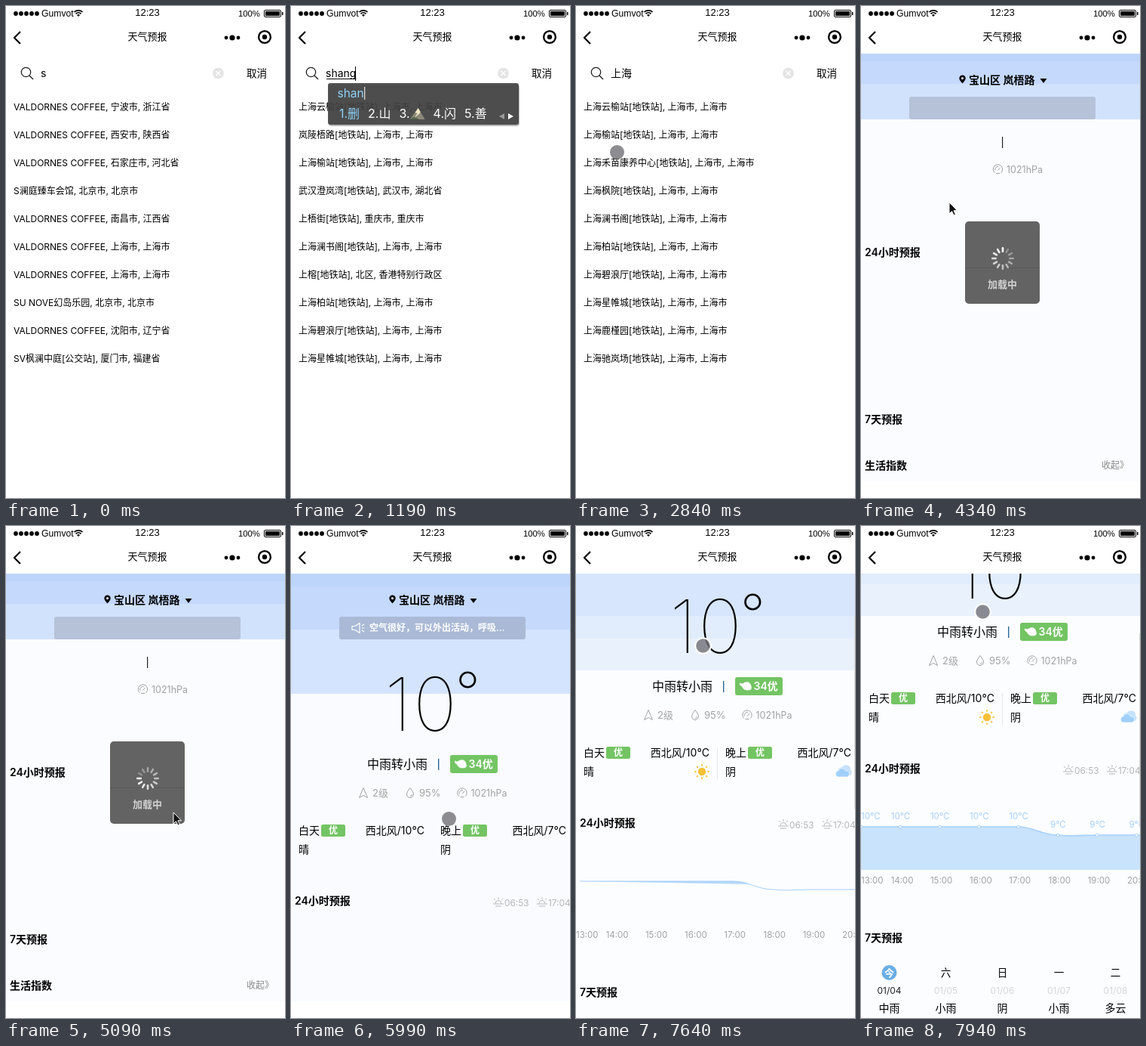
An HTML page for the animation above (8 s loop, 370x651 px).

```html
<!DOCTYPE html>
<html lang="zh-CN">
<head>
<meta charset="utf-8">
<title>天气预报</title>
<style>
html, body { margin: 0; width: 100%; height: 100%; overflow: hidden; background: #fff; }
svg { display: block; width: 370px; height: 651px; }
text { white-space: pre; }
</style>
</head>
<body>
<svg id="stage" viewBox="0 0 370 651"></svg>
<script>
const LOOP = 8000, FIRST = 290, STEP = 150;
const UI = 'Inter, "Noto Sans CJK SC", "Noto Sans CJK", sans-serif';
const SYS = '"Liberation Sans", sans-serif';
const GREEN = '#73c463', GRAY = '#a2a2a2', BLUE = '#a6d0fa';

const pen = document.createElement('canvas').getContext('2d');
const widthOf = (s, size) => { pen.font = `${size}px ${UI}`; return pen.measureText(s).width; };

// y is the vertical centre of the glyphs; baselines sit on whole pixels
const T = (s, x, y, size = 14, { fill = '#000', w = 400, a = 'start', font = UI } = {}) =>
  `<text x="${x}" y="${Math.round(y + size * .37)}" font-size="${size}" font-weight="${w}" fill="${fill}" text-anchor="${a}" font-family='${font}'>${s}</text>`;
const R = (x, y, w, h, fill, r = 0) => `<rect x="${x}" y="${y}" width="${w}" height="${h}" rx="${r}" fill="${fill}"/>`;
const C = (x, y, r, fill, more = '') => `<circle cx="${x}" cy="${y}" r="${r}" fill="${fill}" ${more}/>`;
const L = (d, stroke, w = 1, fill = 'none') =>
  `<path d="${d}" fill="${fill}" stroke="${stroke}" stroke-width="${w}" stroke-linejoin="round"/>`;
const at = (x, y, s) => `<g transform="translate(${x} ${y})">${s}</g>`;
const since = (table, t) => table.filter(row => row[0] <= t).pop();

// ---------- search page ----------
const sh = names => names.split(' ').map(n => n + '[地铁站], 上海市, 上海市');
const coffee = place => 'VALDORNES COFFEE, ' + place;
const LIST_S = [
  coffee('宁波市, 浙江省'), coffee('西安市, 陕西省'), coffee('石家庄市, 河北省'),
  'S澜庭臻车会馆, 北京市, 北京市', coffee('南昌市, 江西省'), coffee('上海市, 上海市'),
  coffee('上海市, 上海市'), 'SU NOVE幻岛乐园, 北京市, 北京市', coffee('沈阳市, 辽宁省'),
  'SV枫澜中庭[公交站], 厦门市, 福建省'];
const LIST_SHANG = [
  ...sh('上海云榆站 岚陵梧路 上海榆站'), '武汉澄岚湾[地铁站], 武汉市, 湖北省',
  '上梧街[地铁站], 重庆市, 重庆市', ...sh('上海澜书阁'), '上榕[地铁站], 北区, 香港特别行政区',
  ...sh('上海柏站 上海碧浪厅 上海星帷城')];
const LIST_FINAL = sh('上海云榆站 上海榆站 上海禾苗康养中心 上海枫院 上海澜书阁 上海柏站 上海碧浪厅 上海星帷城 上海鹿槿园 上海驰岚场');
const LIST_MID = [3, 0, 4, 1, 5, 6, 2, 7, 9, 8].map(i => LIST_FINAL[i]);
const LISTS = [[0, LIST_S], [1040, LIST_SHANG], [1790, LIST_MID], [2390, LIST_FINAL]];

// time, field text, composing, caret
const FIELD = [
  [0, 's', 0, 0], [290, 's', 1, 1], [740, 'sh', 1, 1], [890, 'sha', 1, 1], [1040, 'shan', 1, 1],
  [1190, 'shang', 1, 1], [1340, 'shangh', 1, 1], [1490, 'shanghai', 1, 1],
  [2240, '上海', 0, 1], [2840, '上海', 0, 0]];
// time, typed letters, candidates
const POPUP = [
  [0, ''], [590, 's', '是 说 时 上 三'], [890, 'sh', '是 上 时 说 谁'], [1040, 'sha', '啥 沙 杀 傻 纱'],
  [1190, 'shan', '删 山 ^ 闪 善'], [1340, 'shang', '上 商 伤 尚 赏'],
  [1490, 'shangh', '上海 商行 上 商 伤'], [1790, 'shanghai', '上海 伤害 商海 上还 上'], [2240, '']];

function popup(t) {
  const [, typed, words] = since(POPUP, t);
  if (!typed) return '';
  let x = 64, s = T(typed, 61.5, 115, 15.5, { fill: '#8fd2f8' });
  s += R(62 + widthOf(typed, 15.5), 107, 1, 17, '#fff');
  words.split(' ').forEach((word, i) => {
    const peak = word === '^', label = `${i + 1}.` + (peak ? '' : word);
    s += T(label, x, 142, 16, { fill: i ? '#fff' : '#8fd2f8' });
    x += widthOf(label, 16);
    if (peak) {
      s += at(x, 134, L('M0 16L11 1L20 16Z', 'none', 0, '#8b8878') + L('M11 1L7 7L10 8L6 14L13 8L14 6Z', 'none', 0, '#f1e6c4') + L('M0 16Q6 10 12 16Z', 'none', 0, '#54684a'));
      x += 20;
    }
    x += 11;
  });
  const right = Math.round(x + 31);
  return R(50, 104, right - 49, 55, 'rgba(0,0,0,.28)', 4) + R(49, 102, right - 49, 55, 'rgba(66,66,66,.9)', 3) + s +
    L(`M${right - 19} 142v8l-7-4z`, 'none', 0, '#999') + L(`M${right - 14} 142v8l7-4z`, 'none', 0, '#fff');
}

function searchPage(t) {
  const [, text, composing, caret] = since(FIELD, t), w = widthOf(text, 14);
  return C(26.5, 87.5, 6.2, 'none', 'stroke="#222" stroke-width="1.3"') + L('M31 92L36 97', '#222', 1.4) +
    T(text, 46, 88.5) +
    (composing ? R(47, 96, w - 1, 1, '#000') : '') + (caret ? R(Math.round(46 + w) - 1, 80, 1, 19, '#000') : '') +
    C(281.5, 89, 7.3, '#e4e4e4') + L('M278.5 86l6 6m0-6l-6 6', '#fff', 1.5) + T('取消', 319, 88.5, 13.6) +
    since(LISTS, t)[1].map((row, i) => T(row, 10, 133.5 + 37 * i, 12)).join('') + popup(t);
}

// ---------- weather page ----------
const bands = (stops, end) => stops.map(([y, fill], i) => R(0, y, 370, (stops[i + 1] || [end])[0] - y, fill)).join('');
const title = (s, y) => T(s, 5, y, 14, { w: 600 });
const place = () => L('M134.5 102.5C132 99.5 130.3 97.6 130.3 95.7a4.2 4.2 0 0 1 8.4 0C138.7 97.6 137 99.5 134.5 102.5Z', 'none', 0, '#000') +
  C(134.5, 95.7, 1.6, '#d2e2fd') + T('宝山区 岚梧路', 143, 98, 14, { w: 600 }) + L('M237.5 96h9l-4.5 6z', 'none', 0, '#000');
const gauge = (x, y) => at(x, y, L('M-4.2 4.6A6.2 6.2 0 1 1 4.2 4.6M-2.5 5.5H2.5', GRAY) + L('M-3.6 1.5A3.8 3.8 0 0 1 1-3.4M0 1.5L3-2', GRAY)) +
  T('1021hPa', x + 11.5, y, 12.5, { fill: GRAY });

function toast(t) {
  const head = 9 + Math.round((t - 5090) / 83.3);
  let s = R(138, 285, 99, 109, '#636363', 5) + R(138, 346, 99, 1, '#575757');
  for (let i = 0; i < 12; i++) {
    const age = ((head - i) % 12 + 12) % 12;
    s += `<rect x="186.7" y="319" width="2.6" height="7" rx="1.3" fill="#fff" opacity="${1 - age * .065}" transform="rotate(${i * 30} 188 334)"/>`;
  }
  return s + T('加载中', 187.5, 368, 13, { fill: '#d2d2d2', w: 600, a: 'middle' });
}

function loadingPage(t) {
  return R(0, 63, 370, 566, '#fbfcff') + bands([[63, '#bdd5fb'], [73, '#c5d9fd'], [103, '#d1e2fd']], 150) +
    place() + R(64, 120, 247, 30, '#b5c2d8', 3) + R(187, 173, 1.2, 15, '#222') + gauge(181.5, 216) +
    title('24小时预报', 326) + title('7天预报', 547) + title('生活指数', 608) +
    T('收起》', 319, 608, 12, { fill: '#888' }) + (t < 5540 ? toast(t) : '');
}

const badge = x => R(x, 395, 32, 16, GREEN, 2.5) + T('优', x + 16, 403, 12, { fill: '#fff', w: 600, a: 'middle' });
const half = (x, end, name, wind, sky) =>
  T(name, x, 403) + badge(x + 30) + T(wind, end, 403, 14, { a: 'end' }) + T(sky, x, 428);

function sun(x, y) {
  let rays = '';
  for (let i = 0; i < 8; i++) rays += `<path d="M0-7.5V-9.8" stroke="#f6c544" stroke-width="2" transform="rotate(${i * 45})"/>`;
  return at(x, y, C(0, 0, 5.2, '#f6c037') + rays);
}
const cloud = (x, y) => at(x, y,
  L('M-2 5a5.5 5.5 0 0 1 0-11a6 6 0 0 1 11 4a4 4 0 0 1-1 7Z', 'none', 0, '#c4e2fc') +
  L('M-6 7a4 4 0 0 1-1-8a5 5 0 0 1 9.5 0a4 4 0 0 1 2 8Z', '#fff', .6, '#a0d0fa'));
const horizon = (x, time) => at(x, 498, L('M-7 2H7M-4 5H4M-4 1.5A4 4 0 0 1 4 1.5M0-4V-7M-4-3L-6-5M4-3L6-5', '#b8b8b8')) +
  T(time, x + 8, 498.5, 11.8, { fill: '#b5b5b5' });

function chart(full) {
  const curve = '573H208C228 573 241 584 261 584C276 586 298 584 313 584H370';
  let s = full
    ? L(`M0 ${curve}V630H0Z`, 'none', 0, '#c9e3fd') + L(`M0 ${curve}`, BLUE, 1.6)
    : L('M5 573H208Q222 573 232 577Z', 'none', 0, '#b3d8fb') + L(`M5 ${curve}`, BLUE, 1);
  for (let i = 0; full && i < 8; i++) {
    const x = i * 52.2, warm = i < 5, y = warm ? 573 : 584;
    s += C(x, y, 1.9, '#fff', `stroke="${BLUE}"`) +
      T(warm ? '10°C' : '9°C', Math.max(0, x - (warm ? 12.5 : 10)), y - 14, 11.6, { fill: BLUE });
  }
  return s;
}
const hours = () => [...Array(8).keys()].map(i =>
  T(`${13 + i}:00`, Math.max(0, i * 52.2 - 12.5), 643.5, 11.5, { fill: GRAY })).join('');

const DAYS = ['今 中雨', '六 小雨', '日 阴', '一 小雨', '二 多云'];
const week = () => DAYS.map((day, i) => {
  const [name, sky] = day.split(' '), x = 37.5 + 75 * i, a = 'middle';
  return (i ? T(name, x, 766, 13.5, { a }) : C(x, 766, 10, '#6aaee5') + T(name, x, 766, 13, { a, fill: '#fff', w: 600 })) +
    T(`01/0${4 + i}`, x, 789.5, 12, { a, fill: i ? '#d6d6d6' : '#222' }) + T(sky, x, 812.5, 14, { a });
}).join('');

function weatherPage(t) {
  const scroll = t < 7640 ? 0 : 103 + (t - 7640) * .24;
  const back = scroll
    ? R(0, 0, 370, 900, '#fcfdff') + bands([[63, '#d7e5fd'], [222, '#e1edfd'], [252, '#e9f1fd']], 294)
    : R(0, 63, 370, 566, '#f9fbff') + bands([[63, '#bdd5fb'], [80, '#c5d9fd'], [137, '#d4e4fe']], 222);
  const thin = { w: 100 };
  let s = back + place() + R(64, 120, 247, 30, '#aabad6', 3) +
    L('M81 132.5h4l6-4v13l-6-4h-4zM94 132l3-2M94 135h3.5M94 138l3 2', '#fff', 1.2) +
    T('空气很好，可以外出活动，呼吸…', 104, 135, 12, { fill: '#fff', w: 600 }) +
    T('1', 160, 234.5, 98, { ...thin, a: 'end' }) + T('0', 191, 234.5, 98, { ...thin, a: 'middle' }) +
    C(234.3, 203.5, 9.8, 'none', 'stroke="#000" stroke-width="2.6"') +
    T('中雨转小雨', 101, 315, 16) + R(195, 308, 1.4, 15, '#2c6a96') +
    R(211, 303, 63, 24, GREEN, 3) +
    L('M217 311Q221 313 224 310Q230 308 232 314Q234 320 229 320Q222 321 220 315Q217 314 217 311Z', '#fff', .5, '#fff') +
    T('34优', 235.5, 315, 14, { fill: '#fff', w: 600 }) +
    L('M96 346.5l5.5 13l-5.5-3l-5.5 3z', GRAY) + T('2级', 108, 353, 13, { fill: GRAY }) +
    L('M158 346.5C160.5 350 162.5 352.5 162.5 355a4.5 4.5 0 0 1-9 0C153.5 352.5 155.5 350 158 346.5ZM158 357.5a2.5 2.5 0 0 0 2.5-2.5', GRAY) +
    T('95%', 170, 353, 13, { fill: GRAY }) + gauge(227, 353) +
    half(10, 177, '白天', '西北风/10°C', '晴') + half(198, 365, '晚上', '西北风/7°C', '阴') +
    title('24小时预报', 496) + horizon(275, '06:53') + horizon(333, '17:04') + title('7天预报', 720) + week();
  if (t >= 6140) s += R(187, 396, 1, 42, '#e4e8ee') + sun(167, 428) + cloud(355, 428);
  if (t >= 6440) s += hours();
  if (t >= 6740) s += chart(t >= 7790);
  return at(0, -scroll, s) + (scroll ? R(369, 119 + (scroll - 103) * .32, 1, 256, '#dcdcdc') : '');
}

// ---------- pointer and top bar ----------
const PATH = [
  [2840, 54.5, 193.5], [3140, 46, 206], [3440, 72, 214], [3590, 79, 218], [4040, 79, 218], [4190, 96, 236],
  [5090, 222, 379], [5540, 209, 425], [5840, 209, 425], [5990, 209.5, 387.5], [6890, 190, 324],
  [7340, 172, 232], [7490, 172, 232], [7640, 168.5, 158.5], [7940, 161.5, 113.5]];

function pointer(t) {
  if (t < PATH[0][0]) return '';
  const a = since(PATH, t), b = PATH[PATH.indexOf(a) + 1] || a;
  const k = b === a ? 0 : (t - a[0]) / (b[0] - a[0]);
  const x = a[1] + (b[1] - a[1]) * k, y = a[2] + (b[2] - a[2]) * k;
  if (t >= 4190 && t < 5540) return at(x, y, L('M0 0V15L3.5 11.7L6 17L8.3 16L6 10.8H10.5Z', '#fff', 1, '#111'));
  const ring = t >= 7640 ? 'stroke="#fff" stroke-width="2"' : '';
  return C(x, y, ring ? 10.3 : 9.5, 'rgba(112,113,118,.8)', ring);
}

function topBar() {
  let s = R(0, 0, 370, 63, '#fff');
  for (let i = 0; i < 5; i++) s += C(13 + 7 * i, 10, 2.9, '#000');
  return s + T('Gumvot', 47, 9, 12.2, { font: SYS }) +
    L('M90.5 8A8 8 0 0 1 101.5 8M92.5 10.3A5 5 0 0 1 99.5 10.3', '#000', 1.7) + L('M94 12A3 3 0 0 1 98 12L96 14Z', 'none', 0, '#000') +
    T('12:23', 187.5, 8.5, 13, { a: 'middle', font: SYS }) + T('100%', 308, 9.5, 11.3, { font: SYS }) +
    '<rect x="342.5" y="5.5" width="22" height="9" rx="1.5" fill="none" stroke="#000"/>' + R(344, 7, 19, 6, '#000') + R(366, 8, 1.5, 4, '#000') +
    L('M19 34L11 42L19 50', '#000', 2.2) + T('天气预报', 187.5, 40, 13, { a: 'middle' }) +
    C(292, 42, 2.4, '#000') + C(300, 42, 3.6, '#000') + C(308, 42, 2.4, '#000') +
    C(343, 41, 7.9, 'none', 'stroke="#000" stroke-width="2.4"') + C(343, 41, 3.2, '#000');
}

const stage = document.getElementById('stage');
const start = performance.now();
let shown = -1;

function draw() {
  const now = (performance.now() - start) % LOOP;
  const t = now < FIRST ? 0 : FIRST + STEP * Math.floor((now - FIRST) / STEP);
  if (t !== shown) {
    shown = t;
    const page = t < 4190 ? searchPage : t < 5990 ? loadingPage : weatherPage;
    stage.innerHTML = page(t) + topBar() + pointer(t);
  }
  requestAnimationFrame(draw);
}
draw();
</script>
</body>
</html>
```
